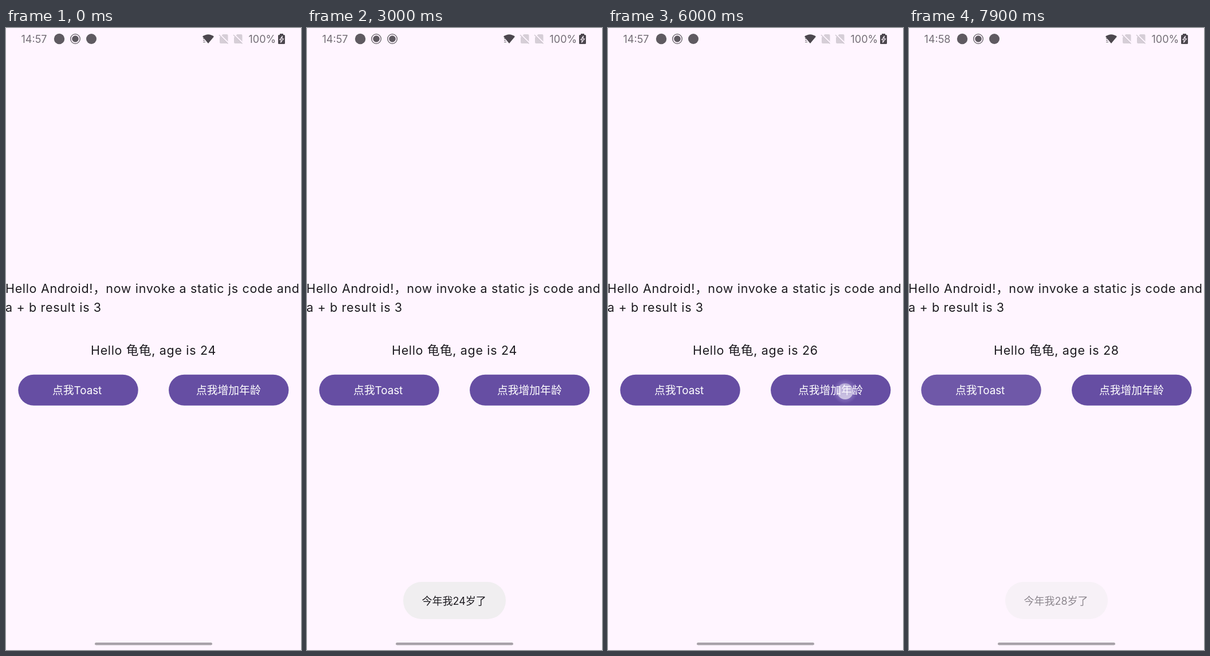
An HTML page that plays this animation: 515 by 1087 pixels, repeating every 8000 ms.

```html
<!DOCTYPE html>
<html lang="zh-CN">
<head>
<meta charset="utf-8">
<title>Age counter</title>
<style>
  html, body { margin: 0; width: 100%; height: 100%; overflow: hidden; background: #fff5ff; }
  svg { display: block; width: 515px; height: 1087px; }
  text { font: 400 21.5px Inter, "Noto Sans CJK SC", sans-serif; fill: #1d1b20; white-space: pre; }
  .body { letter-spacing: .67px; }
  .label { font-size: 18.8px; fill: #fff; }
  .status { font-size: 18px; fill: #736d75; }
  .message { font-size: 18px; }
</style>
</head>
<body>
<svg viewBox="0 0 515 1087">
  <defs>
    <clipPath id="leftClip"><rect x="21.3" y="605.8" width="209.4" height="54" rx="27"/></clipPath>
    <clipPath id="rightClip"><rect x="284.1" y="605.8" width="209.4" height="54" rx="27"/></clipPath>
    <radialGradient id="glow">
      <stop offset=".6" stop-color="#d5c8ff" stop-opacity=".25"/>
      <stop offset="1" stop-color="#d5c8ff" stop-opacity="0"/>
    </radialGradient>
    <linearGradient id="dot" x2="0" y2="1">
      <stop offset="0" stop-color="#fff" stop-opacity=".42"/>
      <stop offset="1" stop-color="#fff" stop-opacity=".6"/>
    </linearGradient>
    <g id="record">
      <circle r="8.3" fill="none" stroke="#5f5a61" stroke-width="1.3"/>
      <circle r="5.8" fill="#5f5a61"/>
    </g>
    <g id="noSim">
      <path d="M6.5 0H13.5Q15.5 0 15.5 2V14Q15.500 16 13.500 16H3Q1 16 1 14V5.500Z" fill="#d6ced7"/>
      <path d="M1 0L17 15.500" stroke="#fff5ff" stroke-width="2"/>
      <path d="M0 1L15.500 16.500" stroke="#d0c8d1" stroke-width="1.400"/>
    </g>
  </defs>
  <rect width="515" height="1087" fill="#fff5ff"/>

  <text id="clock" class="status" x="26.5" y="25.5"></text>
  <circle cx="93" cy="19" r="9.2" fill="#5f5a61"/>
  <use id="newRecord" href="#record"/>
  <use id="oldRecord" href="#record"/>
  <circle id="badge" r="9" fill="#5f5a61"/>
  <path d="M343 15Q353 7.5 363 15L353 27Z" fill="#4c474e"/>
  <path d="M344 18.5h2M344 21.5h3M344 24.5h4" stroke="#69646b"/>
  <use href="#noSim" x="372" y="11"/>
  <use href="#noSim" x="397" y="11"/>
  <text class="status" x="423.5" y="25.5">100%</text>
  <path d="M478 10h6v2h1.5q1.5 0 1.5 1.5v13q0 1.5-1.5 1.5h-9q-1.5 0-1.5-1.5v-13q0-1.5 1.5-1.5H478Z" fill="#4c474e"/>
  <path d="M482.5 14L478 20.5h2.5l-1 5L484.5 19H481.5Z" fill="none" stroke="#fff5ff" stroke-width="1.1"/>

  <text class="body" x="-1" y="463">Hello Android!，now invoke a static js code and</text>
  <text class="body" x="-1" y="495.5">a + b result is 3</text>
  <text id="greeting" class="body" x="148" y="571"></text>

  <g clip-path="url(#leftClip)">
    <rect x="20" y="604" width="212" height="57" fill="#664ea3"/>
    <circle id="leftRipple" fill="#fff"/>
  </g>
  <g clip-path="url(#rightClip)">
    <rect x="283" y="604" width="212" height="57" fill="#664ea3"/>
    <circle id="rightRipple" fill="#fff"/>
  </g>
  <text class="label" x="81" y="639.7">点我Toast</text>
  <text class="label" x="332" y="639.7">点我增加年龄</text>
  <g id="pointer">
    <circle r="22" fill="url(#glow)"/>
    <circle r="14" fill="url(#dot)"/>
  </g>

  <g id="toast">
    <rect x="168" y="968" width="179" height="65" rx="32" fill="#f0eef0"/>
    <text id="message" class="message" x="200.5" y="1007.5"></text>
  </g>
  <rect x="155" y="1074" width="205" height="4.5" rx="2.25" fill="#a8a2a9"/>
</svg>
<script>
const LOOP = 8000, STEP = 100;
const el = id => document.getElementById(id);
const clamp = v => Math.min(1, Math.max(0, v));
const ramp = (t, from, to) => clamp((t - from) / (to - from));
const mix = (a, b, p) => a + (b - a) * p;
const easeOut = p => 1 - (1 - p) ** 3;

const centers = { left: 126, right: 389 };
const taps = [
  { side: 'left', x: 140, y: 635, down: 2400, up: 2600, ripple: 2500 },
  { side: 'right', x: 415, y: 640, down: 4500, up: 4600, ripple: 4450 },
  { side: 'right', x: 418, y: 636, down: 5300, up: 5500, ripple: 5350 },
  { side: 'right', x: 414, y: 635, down: 5900, up: 6200, ripple: 6100 },
  { side: 'right', x: 411, y: 634, down: 6700, up: 6800, ripple: 6700 },
  { side: 'left', x: 140, y: 635, down: 7600, up: 7800, ripple: 7700 }
];

function place(node, x, y, scale, opacity) {
  node.setAttribute('transform', `translate(${x} ${y}) scale(${scale})`);
  node.setAttribute('opacity', opacity);
}

function drawRipple(side, t) {
  const node = el(side + 'Ripple');
  const tap = taps.find(k => k.side === side && t >= k.ripple && t < k.ripple + 400);
  node.setAttribute('opacity', 0);
  if (!tap) return;
  const age = t - tap.ripple;
  const grow = clamp(.525 + age / 100);
  node.setAttribute('cx', mix(tap.x, centers[side], grow));
  node.setAttribute('cy', mix(tap.y, 632.7, grow));
  node.setAttribute('r', mix(63, 121, grow));
  node.setAttribute('opacity', .12 * (1 - ramp(age, 100, 400)) ** 1.7);
}

function drawNotifications(t) {
  const push = easeOut(ramp(t, 0, 500));
  const returned = t >= 5200;
  place(el('newRecord'), 121, 19, push, push);
  place(el('oldRecord'), mix(121, 149, push), 19, 1, returned ? 0 : 1);
  if (returned) {
    place(el('badge'), 149 + 10 * (1 - ramp(t, 5100, 5700)) ** 2.3, 19, 1, ramp(t, 5100, 5300));
  } else {
    place(el('badge'), 149, 19, 1 - push, 1 - push);
  }
}

function draw(time) {
  const t = Math.floor(time / STEP) * STEP;
  const years = 24 + taps.filter(k => k.side === 'right' && t >= k.ripple).length;
  el('clock').textContent = t < 7400 ? '14:57' : '14:58';
  el('greeting').textContent = `Hello 龟龟, age is ${years}`;
  drawNotifications(t);
  drawRipple('left', t);
  drawRipple('right', t);

  const touch = taps.find(k => t >= k.down && t < k.up);
  place(el('pointer'), touch ? touch.x : 0, touch ? touch.y : 0, 1, touch ? 1 : 0);

  const first = ramp(t, 2600, 2800) * (1 - ramp(t, 4600, 5000));
  el('toast').setAttribute('opacity', first + ramp(t, 7800, 8000));
  el('message').textContent = `今年我${t < 5000 ? 24 : years}岁了`;
}

function tick() {
  draw(performance.now() % LOOP);
  requestAnimationFrame(tick);
}
tick();
</script>
</body>
</html>
```
